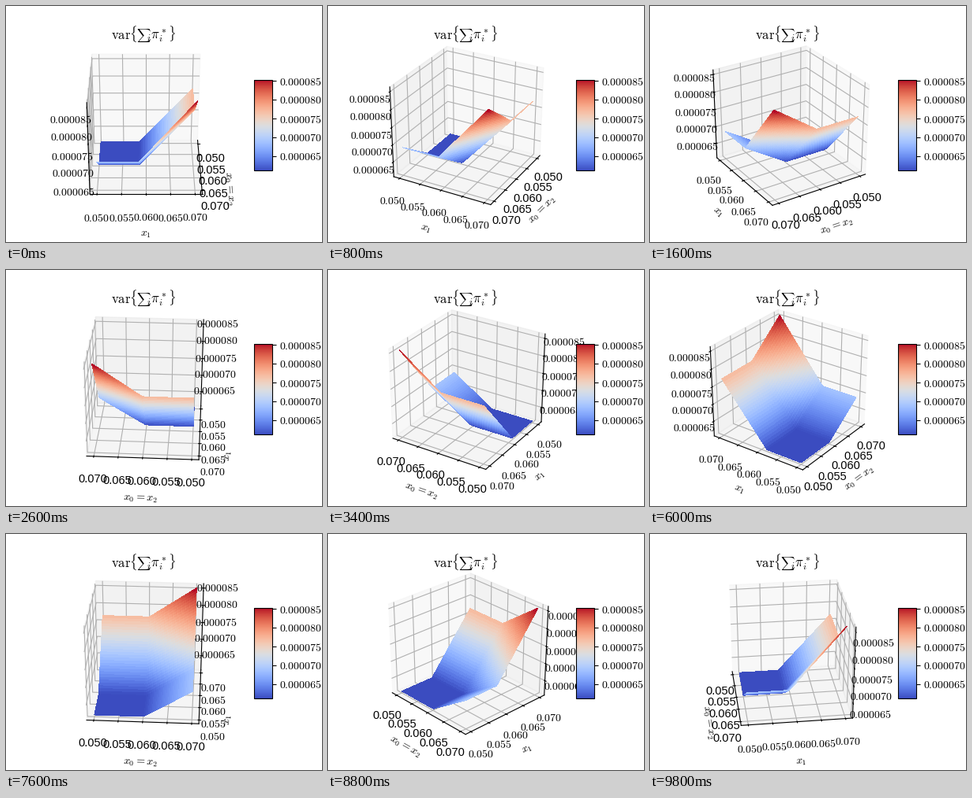
A matplotlib script for the animation above (10000 ms loop, 400 by 300 pixels).

```python
import numpy as np
import matplotlib.pyplot as plt
from matplotlib.animation import FuncAnimation
from matplotlib.ticker import StrMethodFormatter

FRAMES, INTERVAL = 50, 200
LOW, HIGH = 0.05, 0.07
Z_MIN, Z_SPAN = 6.117e-5, 2.459e-5

plt.rcParams.update({
    "mathtext.fontset": "cm",
    "font.family": "Liberation Serif",
    "font.size": 10,
})


def ramp(x, kink):
    """Zero up to the kink, then linear up to 1 at HIGH."""
    return np.clip((x - kink) / (HIGH - kink), 0, None)


def variance(x0, x1):
    r0, r1 = ramp(x0, 0.0601), ramp(x1, 0.0586)
    return Z_MIN + Z_SPAN * (0.315 * r0 + 0.65 * r1 + 0.035 * r0 * r1)


def padded(lo, hi, margin):
    pad = (hi - lo) * margin
    return lo - pad, hi + pad


def title_part(x, text, align, size=12):
    fig.text(x / 400, 1 - 42 / 300, text, ha=align, va="baseline", fontsize=size)


fig = plt.figure(figsize=(4, 3), dpi=100)
ax = fig.add_subplot(projection="3d")

side = np.linspace(LOW, HIGH, 50)
x0, x1 = np.meshgrid(side, side)
surf = ax.plot_surface(x0, x1, variance(x0, x1), cmap="coolwarm",
                       rcount=50, ccount=50, linewidth=0, antialiased=False)

ticks = np.linspace(LOW, HIGH, 5)
z_ticks = np.linspace(6.5e-5, 8.5e-5, 5)
z_format = StrMethodFormatter("${x:.6f}$")

ax.set_xticks(ticks, [f"{t:.3f}" for t in ticks],
              fontfamily="Liberation Sans", fontsize=10.5)
ax.tick_params(axis="x", pad=3)
ax.set_yticks(ticks)
ax.yaxis.set_major_formatter(StrMethodFormatter("${x:.3f}$"))
ax.set_zticks(z_ticks)
ax.zaxis.set_major_formatter(z_format)
ax.set_xlabel("$x_0=x_2$")
ax.set_ylabel("$x_1$")

span = padded(*padded(LOW, HIGH, 0.05), 1 / 48)
ax.set_xlim(span)
ax.set_ylim(span)
ax.set_zlim(padded(Z_MIN, Z_MIN + Z_SPAN, 1 / 48))

# A cube that fills the whole, slightly wide, axes rectangle
ax.set_box_aspect((1, 1, 1), zoom=np.sqrt(3) / 1.8294640721620434)
ax.apply_aspect = lambda position=None: None

fig.colorbar(surf, ax=ax, shrink=0.5, aspect=5, ticks=z_ticks, format=z_format)

# The sum sign is set smaller to get its inline form
title_part(133.2, r"$\mathrm{var}\{$", "left")
title_part(174, r"$\sum$", "center", 8.8)
title_part(215, r"${}_i\pi_i^*\}$", "right")


def update(i):
    # The tiny offset keeps the axis sides well defined at 0 and 180 degrees
    ax.view_init(elev=30, azim=1e-6 + 7.1999999 * i)
    return ()


anim = FuncAnimation(fig, update, frames=FRAMES, interval=INTERVAL,
                     init_func=lambda: update(0), repeat=True)
plt.show()
```
